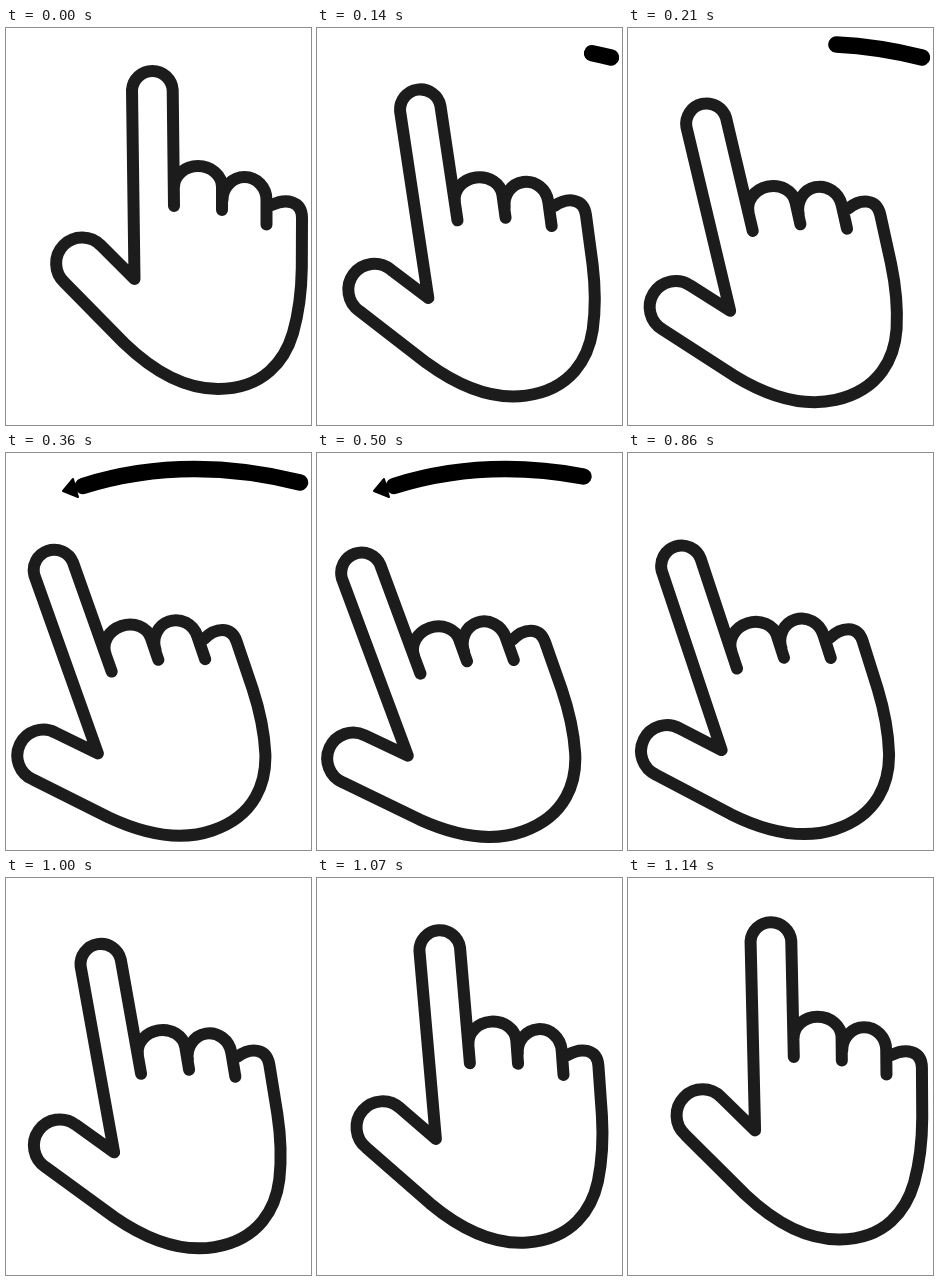
Write an HTML page that moves like this. It is 305 by 397 pixels and loops after 1210 ms.

```html
<!DOCTYPE html>
<html lang="en">
<head>
<meta charset="utf-8">
<title>Swipe left</title>
<style>
  html, body { margin: 0; width: 100%; height: 100%; overflow: hidden; background: #fff; }
  svg { display: block; width: 100vw; height: 100vh; }
  path { stroke-linecap: round; stroke-linejoin: round; }
  #hand { fill: none; stroke: #1c1c1c; stroke-width: 12; }
  #shaft { fill: none; stroke: #000; stroke-width: 16.5; }
</style>
</head>
<body>
<svg viewBox="0 0 305 397">
  <path id="shaft" pathLength="1" d="M294 29.5Q179 1 77 33"/>
  <path id="head" d="M57 38L67 26L72 44Z" stroke="#000" stroke-width="2"/>
  <path id="hand" d="M168 178L166.700 62A20.400 20.400 0 0 0 126 62L128.500 251L95 217.500
    A26 26 0 1 0 58.500 254.500L118 315C147 343 178 361 212 361
    C258 361 279 332 287 305C293 284 295.500 262 295.800 240L296 190C296 173 280 170 266 177
    M168 159A24 21 0 0 1 216 159V182M216.500 172A22 23 0 0 1 260.500 172V196.500"/>
</svg>
<script>
const LOOP = 1210, STEP = LOOP / 17, TILT = 19.62;
const [shaft, head, hand] = ["shaft", "head", "hand"].map(id => document.getElementById(id));

const progress = (t, from, span) => Math.min(1, Math.max(0, (t - from) / span));
// Cosine ease; a bend below 1 rushes the start, above 1 delays it
const ease = (x, bend) => (1 - Math.cos(Math.PI * x ** bend)) / 2;
const show = (el, on) => el.setAttribute("visibility", on ? "visible" : "hidden");

function draw(now) {
  // The motion is held in 17 equal steps
  const t = Math.floor((now % LOOP + 5) / STEP) % 17 * STEP;
  const swing = ease(progress(t, 0, 425), 0.76) - ease(progress(t, 706, 472), 1.38);
  const tip = progress(t, 122, 232);
  const tail = progress(t, 470, 220);

  hand.setAttribute("transform", `rotate(${-TILT * swing} 259 386)`);
  shaft.setAttribute("stroke-dasharray", `${tip - tail} 2`);
  shaft.setAttribute("stroke-dashoffset", -tail);
  show(shaft, tip > tail);
  show(head, tip === 1 && tail < 1);
}

const start = performance.now();
function tick() {
  draw(performance.now() - start);
  requestAnimationFrame(tick);
}
tick();
</script>
</body>
</html>
```
